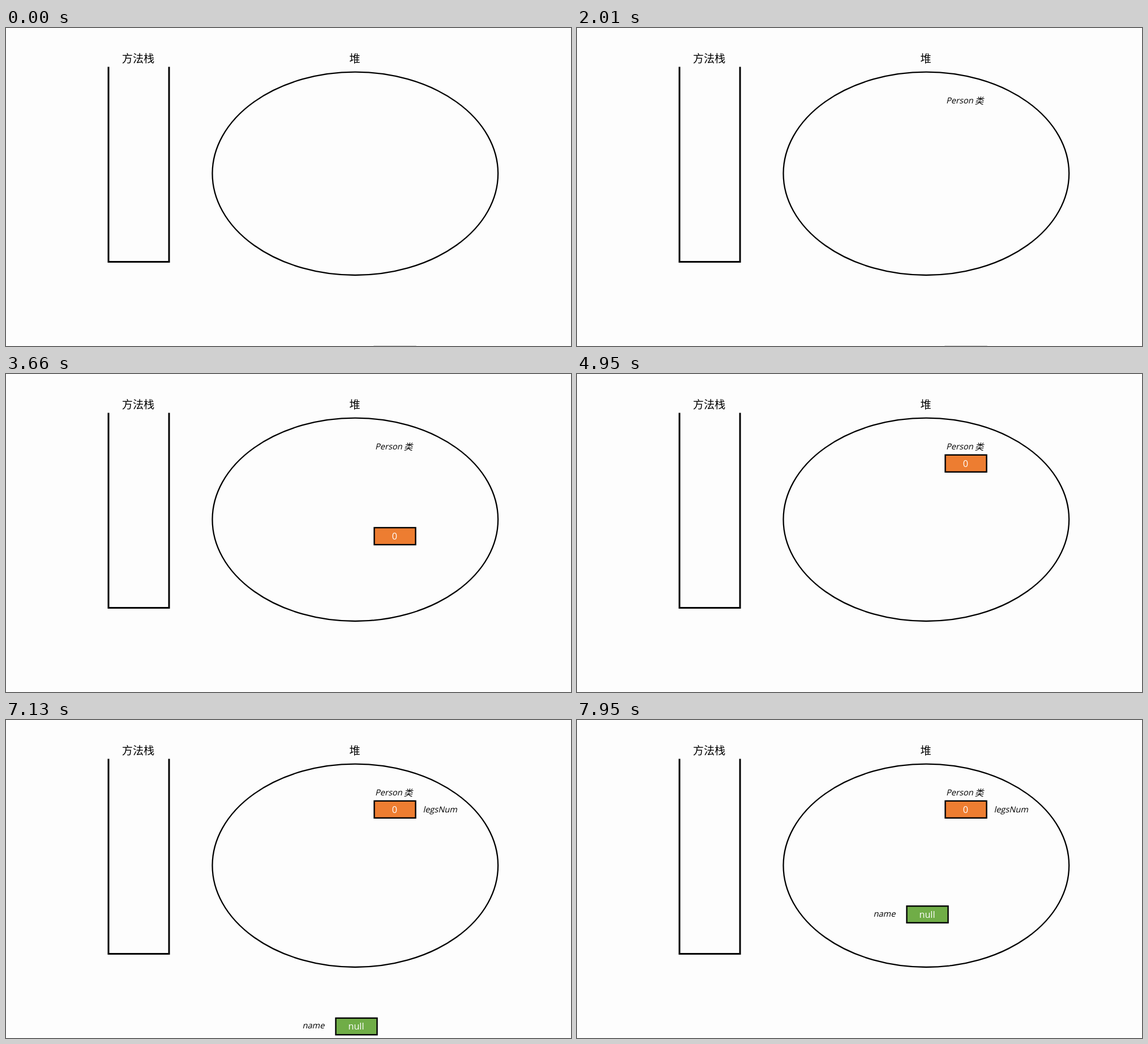
An HTML page that plays this animation: 998 px wide and 561 px high, repeating every 7.99 s.

```html
<!DOCTYPE html>
<html lang="zh-CN">
<head>
<meta charset="utf-8">
<title>方法栈与堆</title>
<style>
  html, body { margin: 0; width: 100%; height: 100%; overflow: hidden; background: #fdfdfd; }
  svg { display: block; width: 998px; height: 561px; }
  text { font-family: "Open Sans", "Noto Sans", "Noto Sans CJK SC", "Noto Sans CJK", sans-serif; }
  .title, .han { font-family: "Noto Sans CJK SC", "Noto Sans CJK", sans-serif; }
  .title { font-size: 19.2px; text-anchor: middle; }
  .label { font-size: 14.6px; }
  .han { font-size: 15.6px; }
  .value { font-size: 16.2px; font-weight: 500; fill: #fff; text-anchor: middle; }
  .box { stroke: #000; stroke-width: 2.4; }
</style>
</head>
<body>
<svg viewBox="0 0 998 561">
  <g fill="none" stroke="#000">
    <path d="M181 68.5V412.5H288V68.5" stroke-width="3"/>
    <ellipse cx="616.8" cy="256.8" rx="252.3" ry="179.2" stroke-width="2.3"/>
  </g>
  <text class="title" x="233.5" y="60.6">方法栈</text>
  <text class="title" x="616" y="60.6">堆</text>

  <g id="className">
    <g transform="translate(652 133) skewX(-13)">
      <text class="label">Person</text>
      <text class="han" x="51" y="1">类</text>
    </g>
  </g>

  <g id="staticField">
    <rect class="box" x="650.5" y="-15" width="73" height="30" fill="#ed7d31"/>
    <text class="value" x="686.5" y="5.8">0</text>
  </g>

  <g id="staticLabel">
    <text class="label" transform="translate(736.5 163) skewX(-13)">legsNum</text>
  </g>

  <g id="instanceField">
    <text class="label" transform="translate(523.5 3.6) skewX(-13)">name</text>
    <rect class="box" x="582.5" y="-14.7" width="73" height="29.4" fill="#70ad47"/>
    <text class="value" x="618.5" y="5.6">null</text>
  </g>
</svg>
<script>
  const LOOP = 7990;
  const BELOW_STAGE = 577;
  const byId = id => document.getElementById(id);
  const progress = (t, start, end) => Math.min(1, Math.max(0, (t - start) / (end - start)));

  const fadeIn = (id, t, start, end) =>
    byId(id).setAttribute("opacity", progress(t, start, end));

  function flyIn(id, t, start, end, restY) {
    const y = BELOW_STAGE + (restY - BELOW_STAGE) * progress(t, start, end);
    byId(id).setAttribute("transform", `translate(0 ${y})`);
  }

  function draw(t) {
    fadeIn("className", t, 990, 2000);
    flyIn("staticField", t, 2967, 3967, 157.8);
    fadeIn("staticLabel", t, 4950, 5980);
    flyIn("instanceField", t, 6980, 7950, 343);
  }

  const begin = performance.now();
  function tick() {
    draw((performance.now() - begin) % LOOP);
    requestAnimationFrame(tick);
  }
  tick();
</script>
</body>
</html>
```
